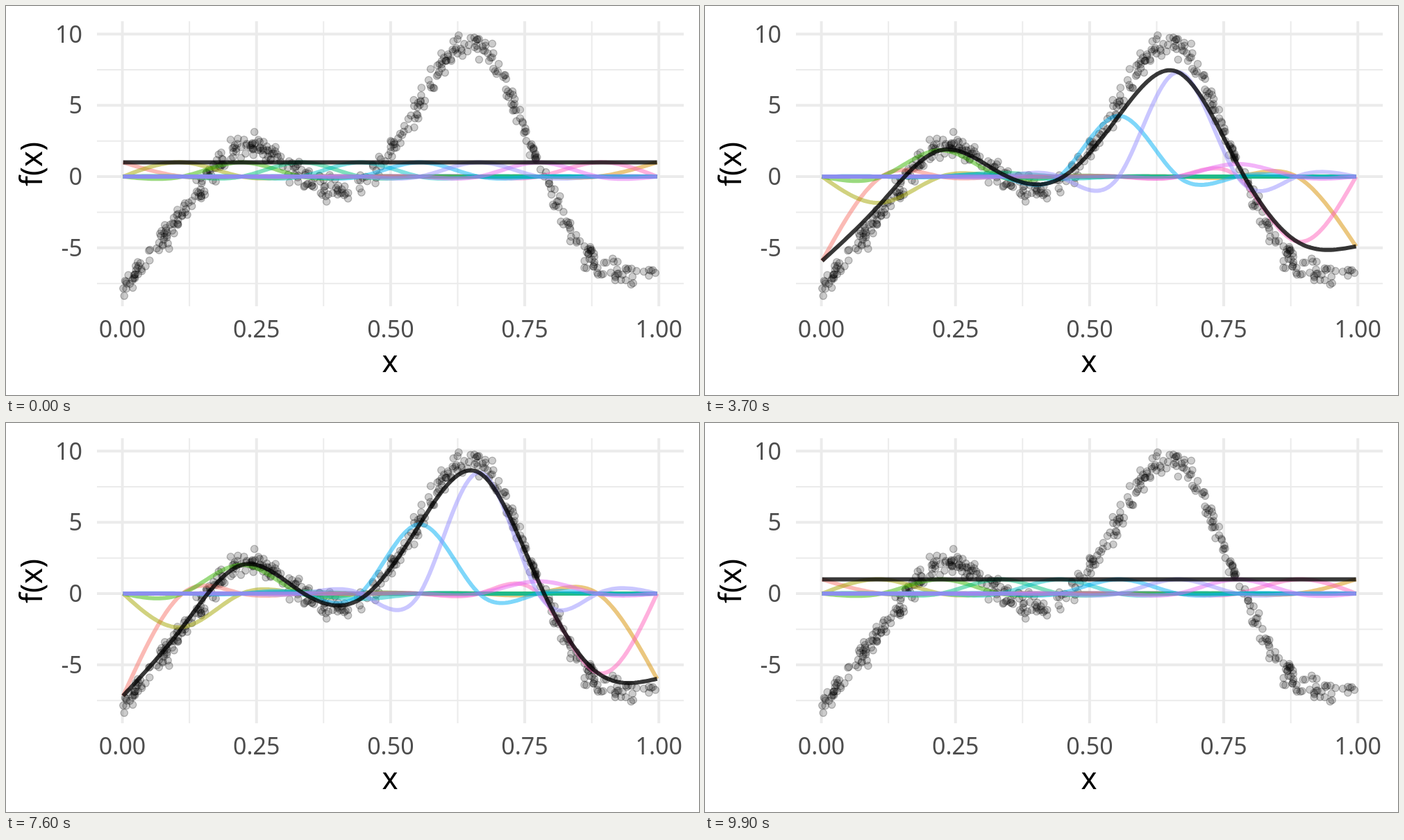
Write an HTML page that moves like this. It is 998 px wide and 561 px high and loops after 10 s.

```html
<!DOCTYPE html>
<html lang="en">
<head>
<meta charset="utf-8">
<title>Spline basis fit</title>
<style>
  html, body { margin: 0; width: 100%; height: 100%; overflow: hidden; background: #fff; }
  svg { display: block; width: 998px; height: 561px; }
  text { font-family: "Noto Sans", "Open Sans", sans-serif; }
  .tick { font-size: 34px; fill: #4d4d4d; }
  .title { font-size: 43.5px; fill: #000; text-anchor: middle; }
  #grid path { stroke: #ebebeb; fill: none; }
  #points circle { fill: rgba(0, 0, 0, .2); stroke: rgba(0, 0, 0, .25); stroke-width: 1.3; }
  #lines path { fill: none; stroke-width: 5.9; stroke-linejoin: round; }
</style>
</head>
<body>
<svg viewBox="0 0 998 561">
  <g id="grid"></g>
  <g id="points"></g>
  <g id="lines"></g>
  <g id="labels">
    <text class="title" x="553" y="528">x</text>
    <text class="title" transform="translate(52 228) rotate(-90)">f(x)</text>
  </g>
</svg>
<script>
const NS = 'http://www.w3.org/2000/svg';
const add = (parent, tag, attrs, text) => {
  const el = document.createElementNS(NS, tag);
  for (const key in attrs) el.setAttribute(key, attrs[key]);
  if (text) el.textContent = text;
  document.getElementById(parent).append(el);
  return el;
};
const px = x => 167.6 + 772.6 * x;
const py = y => 246 - 20.55 * y;

// Grid and tick labels
const vLine = (x, w) => add('grid', 'path', { d: `M${px(x)} 22V433`, 'stroke-width': w });
const hLine = (y, w) => add('grid', 'path', { d: `M131 ${py(y)}H976`, 'stroke-width': w });
for (let i = 0; i < 4; i++) {
  vLine(.125 + i / 4, 2);
  hLine(7.5 - 5 * i, 2);
}
for (let i = 0; i < 5; i++) {
  const x = i / 4;
  vLine(x, 4);
  add('labels', 'text', { class: 'tick', x: px(x), y: 478, 'text-anchor': 'middle' }, x.toFixed(2));
}
for (let y = 10; y >= -5; y -= 5) {
  hLine(y, 4);
  add('labels', 'text', { class: 'tick', x: 110, y: py(y) + 12, 'text-anchor': 'end' }, String(y));
}

// Natural cubic spline basis on evenly spaced knots
const LEFT = 168.7, RIGHT = 937.6, N = 10, SAMPLES = 190;
const WEIGHTS = [-7.9, -2.65, 2.1, .05, -.5, 5.2, 9.15, .85, -6.15, -6.6];

function curvature(v) {
  const m = Array(N).fill(0), c = [0], d = [0];
  for (let i = 1; i < N - 1; i++) {
    const p = 4 - c[i - 1];
    c[i] = 1 / p;
    d[i] = (6 * (v[i - 1] - 2 * v[i] + v[i + 1]) - d[i - 1]) / p;
  }
  for (let i = N - 2; i > 0; i--) m[i] = d[i] - c[i] * m[i + 1];
  return m;
}
function spline(v) {
  const m = curvature(v);
  return u => {
    const i = Math.min(N - 2, Math.floor(u)), b = u - i, a = 1 - b;
    return a * v[i] + b * v[i + 1] + ((a ** 3 - a) * m[i] + (b ** 3 - b) * m[i + 1]) / 6;
  };
}
const sample = f => Array.from({ length: SAMPLES + 1 }, (_, i) => f(i / SAMPLES * (N - 1)));
const basis = WEIGHTS.map((_, k) => sample(spline(WEIGHTS.map((_, i) => +(i === k)))));

// Scatter: seeded noise about the fit
let seed = 20;
const random = () => {
  seed = (seed * 1664525 + 1013904223) % 4294967296;
  return seed / 4294967296;
};
const noise = () => (random() + random() + random() + random() - 2) * .78;
const fit = spline(WEIGHTS);
const POINTS = 470;
for (let i = 0; i < POINTS; i++) {
  const u = random();
  add('points', 'circle', {
    cx: LEFT + (RIGHT - LEFT) * u,
    cy: py(fit(u * (N - 1)) + noise()),
    r: 5.2
  });
}

// Curves, coloured by knot and stacked from back to front
const COLORS = ['#f8766d', '#a3a500', '#39b600', '#00bf7d', '#00bfc4',
  '#00b0f6', '#9590ff', '#e76bf3', '#ff62bc', '#d89000'];
const ORDER = [9, 0, 1, 8, 2, 3, 4, 5, 7, 6];
const curves = ORDER.map(k => ({ k, el: add('lines', 'path', { stroke: COLORS[k], 'stroke-opacity': .5 }) }));
const total = add('lines', 'path', { stroke: '#000', 'stroke-opacity': .78 });

const trace = values => 'M' + values.map((v, i) =>
  (LEFT + (RIGHT - LEFT) * i / SAMPLES).toFixed(2) + ' ' + py(v).toFixed(2)).join('L');
const ease = t => t < .5 ? 4 * t ** 3 : 1 - 4 * (1 - t) ** 3;

// Progress from unit weights to the fit and back, over 100 steps
function progress(step) {
  if (step < 16) return 0;
  if (step < 50) return ease((step - 16) / 34);
  if (step < 67) return 1;
  return 1 - ease((step - 67) / 33);
}
function draw(step) {
  const p = progress(step);
  const sum = Array(SAMPLES + 1).fill(0);
  for (const { k, el } of curves) {
    const w = 1 + (WEIGHTS[k] - 1) * p;
    const values = basis[k].map(b => b * w);
    values.forEach((v, i) => sum[i] += v);
    el.setAttribute('d', trace(values));
  }
  total.setAttribute('d', trace(sum));
}

const start = performance.now();
let shown = -1;
function tick() {
  const step = Math.floor((performance.now() - start) / 100) % 100;
  if (step !== shown) draw(shown = step);
  requestAnimationFrame(tick);
}
tick();
</script>
</body>
</html>
```
